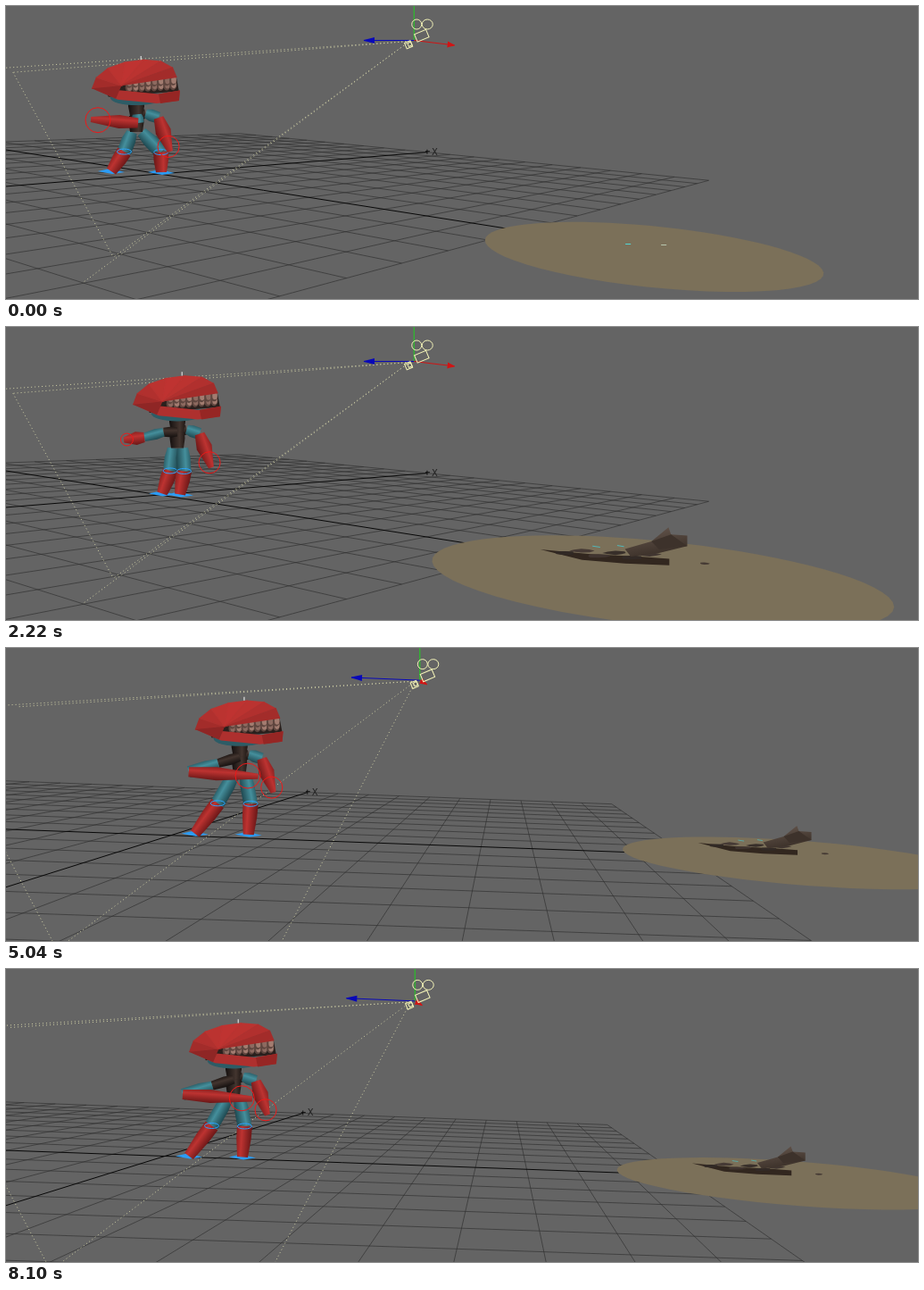
An HTML page with a canvas for the animation above (8400 ms loop, 1022 by 328 pixels).

```html
<!DOCTYPE html>
<html lang="en">
<head>
<meta charset="utf-8">
<title>Creature attack</title>
<style>
html, body { margin: 0; width: 100%; height: 100%; overflow: hidden; background: #646464; }
canvas { display: block; }
</style>
</head>
<body>
<canvas id="stage" width="1022" height="328"></canvas>
<script>
const ctx = document.getElementById('stage').getContext('2d');
const LOOP = 8400, STEP = 60;
const RED = ['#6a1717', '#bd3331', '#8c2221'];
const TEAL = ['#1f4850', '#458f9c', '#2d626c'];
const BROWN = ['#15100f', '#43352f', '#201815'];

const clamp = x => Math.max(0, Math.min(1, x));
const ramp = (t, a, b) => clamp((t - a) / (b - a));
const smooth = x => x * x * (3 - 2 * x);
const lerp = (a, b, k) => a + (b - a) * k;
const mix = (a, b, k) => Array.isArray(a) ? a.map((v, i) => lerp(v, b[i], k)) : lerp(a, b, k);

function between(keys, t) {
  let i = 0;
  while (i < keys.length - 2 && t >= keys[i + 1].at) i++;
  const a = keys[i], b = keys[i + 1];
  return [a, b, ramp(t, a.at, b.at)];
}

// ---- Orbiting viewport: yaw, depth per floor unit, screen place of the floor's middle.
const VIEW = { middle: 575, horizon: 93, focal: 835, roll: .04 };
const front = { yaw: -.553, depth: .57, origin: [172, 188] };
const last = { yaw: .023, depth: .694, origin: [178, 209.5] };
const orbit = [
  { at: 2880, ...front },
  { at: 3360, yaw: -.157, depth: .651, origin: [218, 205] },
  { at: 4320, yaw: 0, depth: .69, origin: [225, 211] },
  { at: 5160, ...last },
];

function viewport(t) {
  const [a, b, k] = between(orbit, t);
  const [yaw, depth, origin] = ['yaw', 'depth', 'origin'].map(n => mix(a[n], b[n], k));
  const sin = Math.sin(yaw), cos = Math.cos(yaw), size = VIEW.focal * depth;
  const dist = (u, v) => 1 + depth * (cos * u + sin * v);
  const at = ([u, v, h = 0]) => {
    const w = dist(u, v), side = size * (cos * v - sin * u);
    return [VIEW.middle + (origin[0] - VIEW.middle + side) / w,
      VIEW.horizon + (origin[1] - VIEW.horizon + VIEW.roll * side - size * h) / w];
  };
  const near = .08;
  const span = (a, b) => {
    const wa = dist(...a), wb = dist(...b);
    const cut = mix(a, b, (near - wa) / (wb - wa));
    return [...at(wa < near ? cut : a), ...at(wb < near ? cut : b)];
  };
  return { origin, at, span, scale: (u, v) => size / dist(u, v) };
}

// ---- Drawing helpers
function trace(p) {
  ctx.beginPath();
  for (let i = 0; i < p.length; i += 2) ctx.lineTo(p[i], p[i + 1]);
}
function poly(p, fill) { trace(p); ctx.fillStyle = fill; ctx.fill(); }
function line(p, color, dash = []) {
  trace(p);
  ctx.setLineDash(dash);
  ctx.strokeStyle = color;
  ctx.lineWidth = 1;
  ctx.stroke();
  ctx.setLineDash([]);
}
function oval(x, y, rx, ry, fill, stroke) {
  ctx.beginPath();
  ctx.ellipse(x, y, rx, ry, 0, 0, 7);
  if (fill) { ctx.fillStyle = fill; ctx.fill(); }
  if (stroke) { ctx.strokeStyle = stroke; ctx.lineWidth = 1; ctx.stroke(); }
}

// Tapered segment, shaded across its width.
function limb([x0, y0], [x1, y1], w0, w1, shades, bulge = (w0 + w1) / 2 + 1) {
  const len = Math.hypot(x1 - x0, y1 - y0);
  if (len < 4) return;
  let nx = (y0 - y1) / len, ny = (x1 - x0) / len;
  if (ny < 0) { nx = -nx; ny = -ny; }
  const w = Math.max(w0, w1, bulge), mx = lerp(x0, x1, .4), my = lerp(y0, y1, .4);
  const fill = ctx.createLinearGradient(mx + nx * w, my + ny * w, mx - nx * w, my - ny * w);
  shades.forEach((c, i) => fill.addColorStop([0, .65, 1][i], c));
  const edge = s => [[x0, y0, w0], [mx, my, bulge], [x1, y1, w1]].map(([x, y, r]) => [x + s * nx * r, y + s * ny * r]);
  poly([...edge(1), ...edge(-1).reverse()].flat(), fill);
}

// ---- Floor and camera icon
function drawFloor(v) {
  const grid = 'rgba(46,46,46,.65)', half = 10;
  for (let i = -half; i <= half; i++) {
    if (!i) continue;
    line(v.span([i / half, -1], [i / half, 1]), grid);
    line(v.span([-1, i / half], [1, i / half]), grid);
  }
  line(v.span([-1, 0], [1, 0]), '#080808');
  line(v.span([0, -1], [0, 1]), '#080808');
  const [x, y] = v.at([1, 0]);
  line([x - 2, y - 1, x + 3, y - 1], '#111');
  line([x, y - 3, x, y + 2], '#111');
  ctx.fillStyle = '#222';
  ctx.font = '10px "DejaVu Sans", sans-serif';
  ctx.fillText('X', x + 5, y + 3);
}

function arrow(from, to, color, head) {
  const k = 1 - head / Math.max(head, Math.hypot(to[0] - from[0], to[1] - from[1]));
  line([...from, ...to], color);
  limb(mix(from, to, k), to, 3.5, .5, [color, color, color], 2.2);
}

function drawCamera(v) {
  const eye = [.405, .435, .345], reach = .17;
  const [x, y] = v.at(eye);
  const farTop = [-.163, -.334, .225], farLow = [.022, -.231, -.235];
  const nearTop = [-.274, -.117, .235], nearLow = [-.332, .292, -.14];
  const pale = '#cfcfa6', dots = [1, 3];
  const lens = [x - 5, y + 1];
  for (const corner of [farTop, farLow, nearTop, nearLow]) line([...lens, ...v.at(corner)], pale, dots);
  line([...v.at(farTop), ...v.at(farLow)], pale, dots);
  const axis = i => v.at(eye.map((c, j) => j === i ? c + (i === 1 ? -reach : reach) : c));
  line([x, y, ...axis(2)], '#20d020');
  arrow([x, y], axis(0), '#d01414', 8);
  arrow([x, y], axis(1), '#0808b8', 12);
  const ink = '#f4f4b8';
  oval(x + 3, y - 18, 5.5, 5.5, null, ink);
  oval(x + 15, y - 18, 6, 5.5, null, ink);
  ctx.save();
  ctx.translate(x, y);
  ctx.rotate(-.4);
  ctx.strokeStyle = ink;
  ctx.strokeRect(3, -6, 14, 9);
  for (const r of [4, 7]) ctx.strokeRect(-4 - r, 2 - r / 2, r, r);
  ctx.restore();
}

// ---- Creature. Arm points are measured from the chest, the rest from the ground between the feet.
const ready = {
  x: -26, spread: 28, hip: 44, sway: 0, lean: 0, nod: 0, tilt: 0, mouth: 0, away: 0, size: 1.04,
  wristL: [2, 8], tipL: [-51, 4], wristR: [25, 2], tipR: [38, 40],
};
const rest = { ...ready, x: 13, spread: 10, hip: 51, sway: 7, wristL: [-37, 6], tipL: [-60, 9] };
const guard = { ...ready, x: 57, spread: 30, hip: 68, sway: 20, wristL: [-57, 17], tipL: [21, 22] };
const windup = { ...ready, x: -12, spread: 40, hip: 61, sway: -14,
  wristL: [-55, 24], tipL: [-148, -59], wristR: [60, -7], tipR: [122, -27] };
const roar = { ...ready, x: -12, spread: 36, hip: 62, sway: 18, tilt: -.15, mouth: .7,
  wristL: [16, -11], tipL: [-56, 28] };
const smash = { ...ready, x: 51, spread: 27, hip: 41, mouth: .6,
  wristL: [344, 88], tipL: [442, 123], tipR: [31, 50] };
const reach = { ...ready, x: 158, spread: 10, hip: 60, lean: -10, nod: 29, tilt: .42, away: 1,
  wristL: [440, 97], tipL: [442, 98], wristR: [66, 30], tipR: [70, 4] };

const moved = (pose, dx, dy) => ({ ...pose, x: pose.x + dx, hop: dy });
const attack = (start, strike, end, drift) => ({ start, keys: [
  { at: 0, ...ready },
  { at: 360, ...moved(windup, drift, 0) },
  { at: 480, ...moved(roar, drift, 0) },
  { at: 720, ...strike },
  { at: 1500, ...strike },
  { at: 1980, ...moved(end, 0, 12) },
  { at: 2220, ...end },
] });
const attacks = [attack(0, smash, rest, 22), attack(2880, reach, guard, 0), attack(5820, reach, guard, 0)];

function drawLeg(hip, foot) {
  const forward = Math.max(0, foot[0] - hip[0]) * .35 + 3;
  const knee = [(hip[0] + foot[0]) / 2 + forward, (hip[1] + foot[1]) / 2];
  const [x, y] = foot;
  poly([x - 15, y, x - 2, y - 3, x + 15, y + 1, x + 1, y + 3], '#2c9cf4');
  limb(hip, knee, 6, 8, TEAL);
  limb(knee, foot, 8.5, 6, RED);
  oval(...knee, 8, 3, null, '#2aa4ff');
}

function drawArm(chest, wrist, tip, bladeWidth) {
  const far = Math.hypot(wrist[0] - chest[0], wrist[1] - chest[1]);
  const blade = Math.hypot(tip[0] - wrist[0], tip[1] - wrist[1]);
  const elbow = mix(chest, wrist, .42);
  elbow[1] -= Math.max(0, 6 - far * .1);
  const thin = far > 90 ? 3.5 : 5;
  limb(chest, elbow, thin, thin, BROWN);
  limb(elbow, wrist, thin, Math.min(6.5, 2 + blade * .12), TEAL);
  limb(wrist, tip, 5.5, 3, RED, bladeWidth(blade));
  const r = Math.min(14, blade * .3);
  if (r > 2) oval(...mix(wrist, tip, .85), r, r, null, '#f01818');
}

function drawTeeth(y) {
  for (let i = 0; i < 8; i++) {
    const x = -8 + i * 6.8;
    oval(x, y - i * .4, 3.8, 5.5, '#5f463f');
    oval(x + .8, y - i * .4 - .8, 2.7, 4.4, i % 2 ? '#a27c70' : '#8d6a60');
  }
}

function drawHead([x, y], { tilt, mouth, away, size }) {
  ctx.save();
  ctx.translate(x, y);
  ctx.rotate(tilt);
  ctx.scale(size, size);
  oval(0, 17, 28, 8, '#2d5c66');
  poly([-34, 6, 43, -6, 46, 10 + mouth * 24, -30, 16], '#2a201d');
  ctx.save();
  ctx.translate(-40, 9);
  ctx.rotate(mouth * .32);
  ctx.translate(40, -9);
  drawTeeth(6 + mouth);
  poly([-47, 7, -16, 9, 24, 13, 47, 9, 46, 20, 22, 23, -20, 19], '#ae302e');
  poly([24, 13, 47, 9, 46, 20, 26, 23], '#962624');
  ctx.restore();
  drawTeeth(1);
  // Faceted dome: a fan of flat panels around the cheek.
  const panels = 7, cheek = [-16, 4 + 18 * away];
  const rim = i => {
    const a = Math.PI * (1 - i / panels), c = Math.cos(a);
    return [-2 + 46 * c, 4 - 27 * Math.sin(a) + (c > 0 ? c * (20 * away - 9) : 3 * -c)];
  };
  for (let i = 0; i < panels; i++) {
    const shade = `hsl(1 59% ${36 + 11 * Math.sin(Math.PI * (i + 1) / (panels + 1))}%)`;
    poly([...cheek, ...rim(i), ...rim(i + 1)], shade);
    line([...cheek, ...rim(i)], shade);
  }
  poly([...rim(0), ...cheek, -22, 18], '#8f2625');
  line([5, -24, 5, -28], '#f0f0f0');
  ctx.restore();
}

function drawCreature(t, { keys }, origin) {
  const [a, b, raw] = between(keys, t), k = smooth(raw);
  const pose = {};
  for (const name in ready) pose[name] = mix(a[name], b[name], k);
  const hop = lerp(a.hop || 0, b.hop || 0, k);
  const hip = [pose.sway, -pose.hip], chest = [pose.sway + pose.lean, -pose.hip - 18];
  const head = [chest[0] + pose.nod, chest[1] - 38];
  const place = p => [chest[0] + p[0], chest[1] + p[1]];
  ctx.save();
  ctx.translate(origin[0] + pose.x, origin[1] - 2 + pose.x * .035 - hop);
  drawLeg([hip[0] - 5, hip[1]], [-pose.spread, 0]);
  drawLeg([hip[0] + 6, hip[1]], [pose.spread, 1]);
  drawArm(chest, place(pose.wristR), place(pose.tipR), len => len * .22);
  limb([head[0], head[1] + 20], chest, 9, 7, BROWN);
  limb(chest, hip, 8, 7, BROWN);
  drawArm(chest, place(pose.wristL), place(pose.tipL), () => 7.5);
  drawHead(head, pose);
  ctx.restore();
}

// ---- Target disc and debris
const SPOT = 1.215;

function drawDisc(t, v) {
  const grow = smooth(ramp(t, 540, 690)) * 1.06 - .06 * ramp(t, 690, 780);
  const r = .25 * (1 + .34 * grow), ring = [];
  for (let a = 0; a < 6.28; a += .1) ring.push(...v.at([.84 * r * Math.cos(a), SPOT + r * Math.sin(a)]));
  poly(ring, '#7b7059');
  if (t > 620) return;
  const [x, y] = v.at([.04, SPOT]);
  line([x - 32, y - 2, x - 26, y - 2], '#50d8d8');
  line([x + 8, y - 1, x + 14, y - 1], '#b8c8b0');
}

const noise = i => { const s = Math.sin(i * 12.99) * 43758.5; return s - Math.floor(s); };

// Flat jagged stone.
function rock(x, y, w, h, seed) {
  const p = [];
  for (let i = 0; i < 8; i++) {
    const a = i * Math.PI / 4, r = .75 + .4 * noise(seed + i);
    p.push(x + w * r * Math.cos(a), y + h * r * Math.sin(a));
  }
  poly(p, `hsl(20 14% ${17 + 8 * noise(seed)}%)`);
}

function drawDebris(t, v, grabbed) {
  const rise = ramp(t, 600, 720);
  if (!rise) return;
  const up = 1 - smooth(ramp(t, 960, 1440));
  const spot = [.04, SPOT - .024], unit = v.scale(...spot) / 750;
  ctx.save();
  ctx.translate(...v.at(spot));
  ctx.scale(unit, unit * rise * lerp(.68, 1, up));
  const stone = ctx.createLinearGradient(0, -55, 15, 0);
  stone.addColorStop(0, '#5e5047');
  stone.addColorStop(1, '#30261f');
  poly([-116, -26, -57, -18, 0, -14, 35, -10, 35, 1, -17, -2, -67, -8], '#32271f');
  for (let i = 0; i < 6; i++) rock(-88 + i * 20, -24 + 5 * i * up + 14 * noise(i + 3), 14, 3.5, i);
  if (up > .5) rock(-5, -24, 24, 9, 5);
  poly([-17, -27, 14, -40, 34, -64, 37, -52, 56, -50, 56, -32, 23, -20, -10, -14], stone);
  poly([14, -40, 37, -52, 56, -32, 23, -26], '#3d322b');
  rock(76, -2, 6, 2, 9);
  line([-55, -32, -46, -30], '#48c8d0');
  line([-26, -33, -18, -31], '#48c8d0');
  if (grabbed) limb([-72, -12], [12, -18], 3, 2, RED, 6);
  ctx.restore();
}

function render(t) {
  const index = attacks.filter(a => t >= a.start).length - 1;
  const local = t - attacks[index].start, v = viewport(t);
  ctx.fillStyle = '#646464';
  ctx.fillRect(0, 0, 1022, 328);
  drawFloor(v);
  drawDisc(local, v);
  drawCamera(v);
  drawCreature(local, attacks[index], v.origin);
  drawDebris(local, v, index > 0 && local >= 720 && local < 1560);
}

function tick(now) {
  render(Math.floor((now % LOOP) / STEP) * STEP);
  requestAnimationFrame(tick);
}
render(0);
requestAnimationFrame(tick);
</script>
</body>
</html>
```
